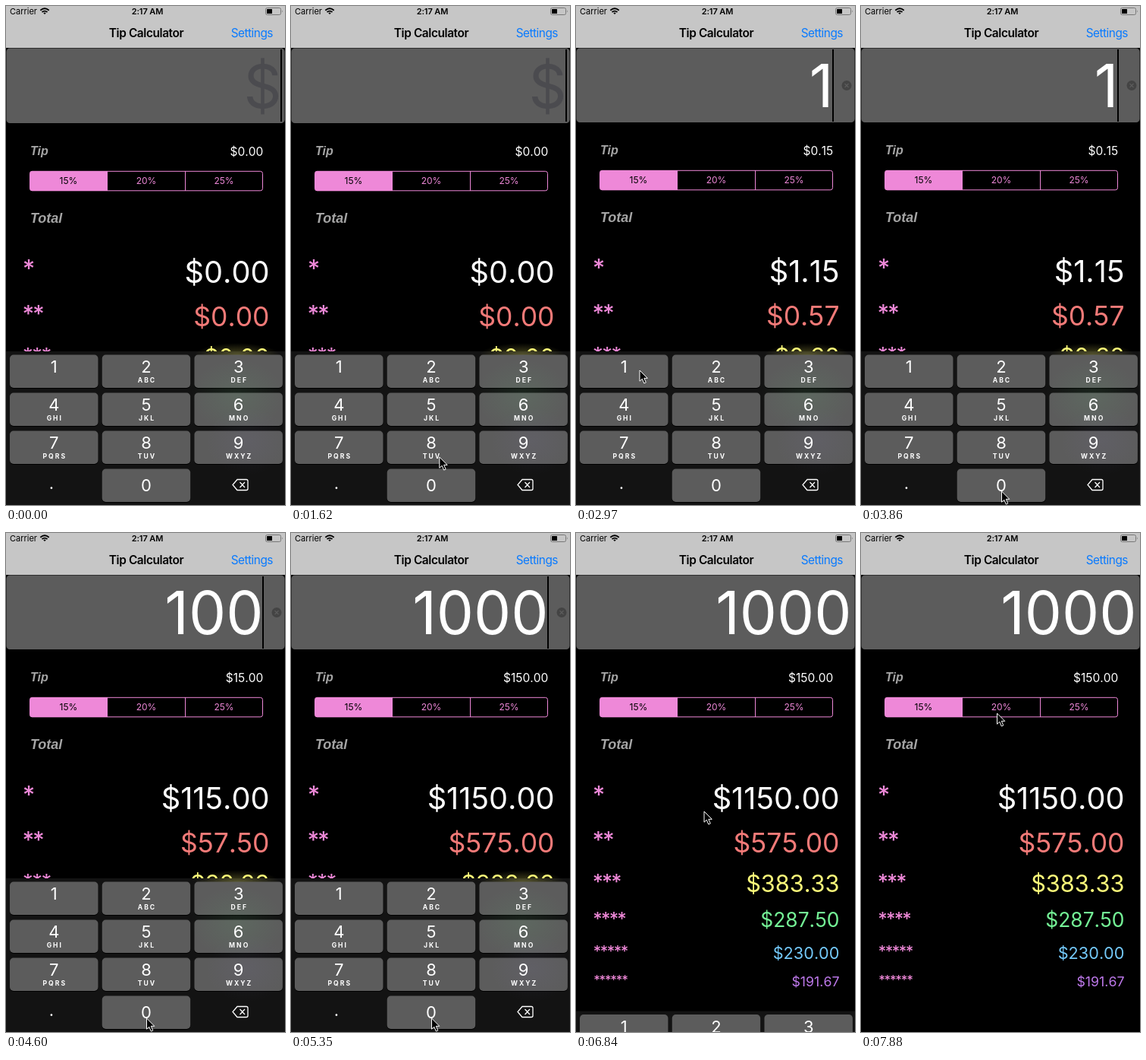
These frames come from a looping animation (368 by 656 pixels, 8 s). An HTML page:

```html
<!DOCTYPE html>
<html lang="en">
<head>
<meta charset="utf-8">
<title>Tip Calculator</title>
<style>
  html, body { margin: 0; width: 100%; height: 100%; overflow: hidden; background: #000; }
  svg { display: block; width: 368px; height: 656px; font-family: Inter, sans-serif; }
  .end { text-anchor: end; }
  .mid { text-anchor: middle; }
  .label { font: italic bold 16px "Liberation Sans", sans-serif; fill: #a5a5a5; }
  .amount { font-kerning: none; }
  .key { fill: #5c5c5c; }
  .key.down { fill: #303030; }
  .letters { font-size: 8.6px; font-weight: 700; letter-spacing: 2px; }
  .sliding .glow { display: none; }
</style>
</head>
<body>
<svg viewBox="0 0 368 656">
  <defs>
    <radialGradient id="yellow"><stop stop-color="#f5f06a" stop-opacity=".3"/><stop offset="1" stop-color="#f5f06a" stop-opacity="0"/></radialGradient>
    <radialGradient id="green"><stop stop-color="#6ef08c" stop-opacity=".08"/><stop offset="1" stop-color="#6ef08c" stop-opacity="0"/></radialGradient>
    <radialGradient id="violet"><stop stop-color="#9a8cf0" stop-opacity=".06"/><stop offset="1" stop-color="#9a8cf0" stop-opacity="0"/></radialGradient>
  </defs>
  <rect width="368" height="656"/>

  <rect width="368" height="55" fill="#c6c6c6"/>
  <text x="5" y="11" font-size="11">Carrier</text>
  <g fill="none" stroke="#000" stroke-width="1.8">
    <path d="M45.300 5.700Q51 .9 56.700 5.700M47.500 8Q51 5.200 54.500 8"/>
    <path d="M49.300 9.200Q51 8 52.700 9.200L51 11Z" fill="#000" stroke="none"/>
  </g>
  <text class="mid" x="186.500" y="11" font-size="11" font-weight="600" letter-spacing="-.1">2:17 AM</text>
  <rect x="342.500" y="2.500" width="20" height="9" rx="2" fill="none" stroke="#777"/>
  <rect x="344" y="4" width="7" height="6" rx=".5"/>
  <path d="M364 5.500Q365.800 7 364 8.500Z" fill="#777"/>
  <text class="mid" x="185" y="41" font-size="15.400" font-weight="600" letter-spacing="-.4">Tip Calculator</text>
  <text class="end" x="352" y="41" font-size="15.400" letter-spacing="-.5" fill="#087aff">Settings</text>

  <rect id="field" x=".5" y="55.500" width="367" height="98.500" rx="4.500" fill="#5c5c5c"/>
  <text id="bill" class="end" font-size="78"></text>
  <rect id="caret" y="57" width="2" height="95"/>
  <g id="clear">
    <circle cx="357" cy="104.500" r="6.500" fill="#444"/>
    <path d="M354.500 102l5 5m0-5l-5 5" stroke="#5c5c5c" stroke-width="1.200"/>
  </g>

  <g id="content">
    <text class="label" x="32" y="196">Tip</text>
    <text id="tip" class="end amount" x="339.200" y="196.500" font-size="15.500" fill="#fff"></text>
    <g font-size="12" fill="#ee88d8">
      <rect x="31.500" y="217.300" width="307" height="25.500" rx="3" fill="none" stroke="#ee88d8"/>
      <path d="M134 217H34.500a3 3 0 0 0-3 3v20a3 3 0 0 0 3 3H134zM236 217h1v26h-1z"/>
      <text class="mid" x="82.500" y="234.300" fill="#000">15%</text>
      <text class="mid" x="185" y="234.300">20%</text>
      <text class="mid" x="287.500" y="234.300">25%</text>
    </g>
    <text class="label" x="32" y="285" style="font-size:18px">Total</text>
  </g>

  <g id="keyboard">
    <rect y="454" width="368" height="204" fill="#131313"/>
    <ellipse class="glow" cx="305" cy="459" rx="56" ry="16" fill="url(#yellow)"/>
    <g id="keys"></g>
    <g class="glow">
      <ellipse cx="305" cy="512" rx="62" ry="48" fill="url(#green)"/>
      <ellipse cx="318" cy="572" rx="55" ry="45" fill="url(#violet)"/>
    </g>
    <g id="digits" class="mid" fill="#fff"></g>
    <path d="M305 622.500H317a2 2 0 0 1 2 2V634.500a2 2 0 0 1-2 2H305L299 629.500ZM308.500 626l6.500 7m0-7l-6.500 7" fill="none" stroke="#fff" stroke-width="1.300"/>
  </g>

  <path id="pointer" d="M0 0V14.200L3.300 11.200 5.800 17 8.300 15.900 5.800 10.300H10.300Z" stroke="#fff" stroke-linejoin="round"/>
</svg>

<script>
const $ = id => document.getElementById(id);

function add(parent, name, attrs, text = '') {
  const node = document.createElementNS('http://www.w3.org/2000/svg', name);
  for (const key in attrs) node.setAttribute(key, attrs[key]);
  node.textContent = text;
  return parent.appendChild(node);
}
const show = (node, on) => node.setAttribute('visibility', on ? 'visible' : 'hidden');

// Each row: amount baseline, amount size, colour, star centre, star pitch
const totals = [
  [364, 39.7, '#fff', 343, 14.2],
  [421, 35.5, '#f27a78', 402, 13.5],
  [473, 30.7, '#fbf97a', 457, 12.2],
  [519, 26.4, '#74f296', 506, 10.7],
  [560.5, 21.7, '#73c8f8', 549.5, 9],
  [596.5, 17.8, '#bd78ea', 588, 7.4]
].map(([y, size, fill, starY, pitch], i) => {
  const starSize = pitch * 2.25;
  const stars = Array.from({ length: i + 1 }, (_, k) => 30 + k * pitch - i * .5);
  add($('content'), 'text', {
    class: 'mid', x: stars.join(' '), y: starY + starSize * .44, fill: '#ee88d8',
    'font-size': starSize, 'font-weight': 500
  }, '*'.repeat(i + 1));
  return add($('content'), 'text', { class: 'end amount', x: 347.5, y, fill, 'font-size': size });
});

const keys = {};
['1', '2ABC', '3DEF', '4GHI', '5JKL', '6MNO', '7PQRS', '8TUV', '9WXYZ', '', '0'].forEach((face, i) => {
  if (!face) return;
  const x = 5 + i % 3 * 121.7, y = 458.5 + Math.floor(i / 3) * 50;
  const shape = { x, width: 116.5, height: 43.5, rx: 5 };
  add($('keys'), 'rect', { ...shape, y: y + 1 });
  keys[face[0]] = add($('keys'), 'rect', { ...shape, y, class: 'key' });
  add($('digits'), 'text', { x: x + 58.3, y: y + (face === '0' ? 29 : 23.5), 'font-size': 22 }, face[0]);
  add($('digits'), 'text', { x: x + 59.3, y: y + 36, class: 'letters' }, face.slice(1));
});
add($('digits'), 'text', { x: 60, y: 635, 'font-size': 22 }, '.');

const LOOP = 8000, STEP = 148;
const entries = [[2820, 1], [4150, 10], [4600, 100], [5350, 1000]];
const presses = [['1', 2520, 2820], ['0', 4000, 4150], ['0', 5200, 5350]];
const caretOff = [[590, 1030], [1630, 2070], [3420, 3860], [5950, 6400], [6840, LOOP]];
// Pointer moves: start time, number of steps, target
const moves = [[1330, 6, 84, 479], [3270, 3, 185.5, 638], [5650, 5, 169, 366], [7140, 6, 179.5, 237]];

const within = (t, [from, to]) => t >= from && t < to;
const ease = p => p * p * (3 - 2 * p);
const money = value => '$' + value.toFixed(2);

function pointerAt(t) {
  let x = 235, y = 633;
  for (const [start, steps, toX, toY] of moves) {
    if (t < start) break;
    const p = ease(Math.min(steps, Math.floor((t - start) / STEP) + 1) / steps);
    x += (toX - x) * p;
    y += (toY - y) * p;
  }
  return `translate(${x} ${y})`;
}

function render(t) {
  const bill = entries.reduce((last, [at, value]) => t >= at ? value : last, 0);
  const editing = t < 6840;
  const lift = bill ? 1 : 0;
  const right = bill && editing ? 338 : 362;

  $('bill').textContent = bill || '$';
  $('bill').setAttribute('x', right + 1.5);
  $('bill').setAttribute('y', 134 - lift);
  $('bill').setAttribute('fill', bill ? '#fff' : '#4b4b4f');
  $('field').setAttribute('height', 98.5 - lift);
  $('content').setAttribute('transform', `translate(0 ${-lift})`);
  $('caret').setAttribute('x', right);
  show($('caret'), !caretOff.some(span => within(t, span)));
  show($('clear'), bill && editing);

  $('tip').textContent = money(bill * .15);
  totals.forEach((node, i) => node.textContent = money(bill * 1.15 / (i + 1)));

  for (const digit in keys) {
    keys[digit].classList.toggle('down', presses.some(([key, ...span]) => key === digit && within(t, span)));
  }
  $('keyboard').setAttribute('transform', `translate(0 ${editing ? 0 : 174.5})`);
  $('keyboard').classList.toggle('sliding', !editing);
  show($('keyboard'), t < 6990);

  $('pointer').setAttribute('transform', pointerAt(t));
  show($('pointer'), t >= moves[0][0]);
}

const begin = performance.now();
function frame() {
  render((performance.now() - begin) % LOOP);
  requestAnimationFrame(frame);
}
frame();
</script>
</body>
</html>
```
